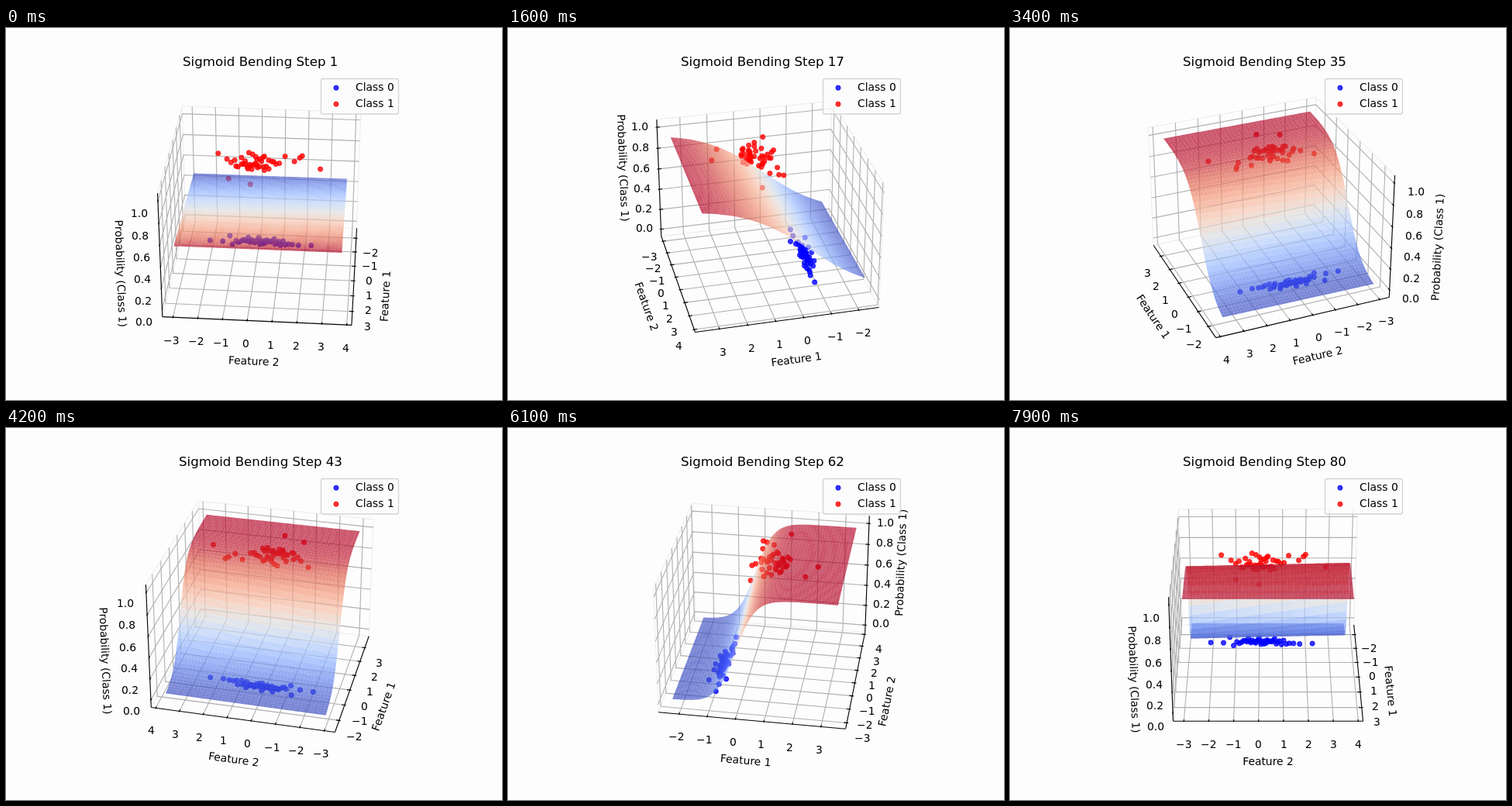
Animation of 640x480 px, one loop 8000 ms. Source, as an HTML page with a canvas:

```html
<!DOCTYPE html>
<html lang="en">
<head>
<meta charset="utf-8">
<title>Sigmoid Bending</title>
<style>
  html, body { margin: 0; width: 100%; height: 100%; overflow: hidden; background: #fdfdfd; }
  canvas { display: block; width: 640px; height: 480px; }
</style>
</head>
<body>
<canvas id="stage" width="640" height="480"></canvas>
<script>
const ctx = document.getElementById('stage').getContext('2d');
const FONT = '"DejaVu Sans", sans-serif';
const STEPS = 80, STEP_MS = 100;
const BLUE = '0,0,255', RED = '255,0,0';

// Box half sizes and the data ranges that fill it
const HALF = 0.5952, HALF_Z = 0.4464;
const X_RANGE = [-2.318, 3.435], Y_RANGE = [-2.946, 3.707];
const DELTA = 0.09524, DELTA_Z = 0.07143;
const PAD_TICK = 1.0372, PAD_LABEL = 2.2548;

const wx = x => (x - 0.559) * 0.1806;
const wy = y => (y - 0.381) * 0.15617;
const wz = z => (z - 0.5) * 0.7793;

function random(seed) {
  return () => {
    seed = (seed * 1664525 + 1013904223) % 4294967296;
    return seed / 4294967296;
  };
}

// Cloud with logistic quantiles along y and seeded normal scatter along x
function cloud(seed, count, x, y) {
  const rnd = random(seed);
  const normal = () => (rnd() + rnd() + rnd() - 1.5) * 2;
  return Array.from({ length: count }, (_, i) => {
    const p = (i + 0.5) / count;
    return [x.mean + x.spread * normal(), y.mean + y.spread * Math.log(p / (1 - p))];
  });
}

const CLASS_0 = cloud(7, 44, { mean: -0.98, spread: 0.15 }, { mean: 0.1, spread: 0.49 });
const CLASS_1 = cloud(21, 40, { mean: 0.95, spread: 0.38 }, { mean: 0.05, spread: 0.36 })
  .concat([[1.17, 2.7], [0.4, 1.82], [0.25, 1.91], [2.44, 0.01], [2.1, -0.89]]);

const COOLWARM = [
  [59, 76, 192], [98, 130, 234], [141, 176, 254], [184, 208, 249], [221, 221, 221],
  [245, 196, 173], [244, 154, 123], [222, 96, 77], [180, 4, 38]
];

function coolwarm(t, alpha) {
  const p = Math.min(Math.max(t, 0), 1) * 8;
  const i = Math.min(Math.floor(p), 7);
  const rgb = COOLWARM[i].map((c, n) => Math.round(c + (COOLWARM[i + 1][n] - c) * (p - i)));
  return `rgba(${rgb.join(',')},${alpha})`;
}

// Perspective camera: elevation 30 degrees, distance 10
function camera(azimuth) {
  const ca = Math.cos(azimuth), sa = Math.sin(azimuth);
  const ce = Math.cos(Math.PI / 6), se = 0.5;
  return (x, y, z) => {
    const near = x * ca + y * sa;
    const depth = near * ce + z * se;
    const scale = 1997.8 / (10 - depth);
    return [333 + (y * ca - x * sa) * scale, 237.4 - (z * ce - near * se) * scale, depth];
  };
}

function line(points, color, width) {
  ctx.beginPath();
  points.forEach(p => ctx.lineTo(p[0], p[1]));
  ctx.strokeStyle = color;
  ctx.lineWidth = width;
  ctx.stroke();
}

function setFont(size = 13.89) {
  ctx.font = `${size}px ${FONT}`;
  ctx.fillStyle = '#000';
}

// Level text sits on whole pixels
function text(str, x, y, size) {
  setFont(size);
  ctx.fillText(str, Math.round(x - ctx.measureText(str).width / 2), Math.round(y));
}

function dot(x, y, rgb) {
  ctx.beginPath();
  ctx.arc(x, y, 3.1, 0, 7);
  ctx.fillStyle = ctx.strokeStyle = `rgba(${rgb},0.8)`;
  ctx.lineWidth = 0.9;
  ctx.fill();
  ctx.stroke();
}

function axisLabel(str, at, from, to) {
  let angle = Math.atan2(to[1] - from[1], to[0] - from[0]) % Math.PI;
  if (angle > Math.PI / 2) angle -= Math.PI;
  if (angle < -Math.PI / 2) angle += Math.PI;
  ctx.save();
  ctx.translate(at[0], at[1]);
  ctx.rotate(angle);
  setFont();
  ctx.fillText(str, -ctx.measureText(str).width / 2, 3.83);
  ctx.restore();
}

// sx, sy: sign of the side of the box that faces the viewer
function drawAxes(proj, sx, sy) {
  const fx = sx * HALF, fy = sy * HALF, lo = -HALF_Z, hi = HALF_Z;
  const out = (sign, pad) => sign * (HALF + DELTA * pad);
  const down = pad => lo - DELTA_Z * pad;

  line([proj(fx, -fy, lo), proj(fx, -fy, hi), proj(-fx, -fy, hi), proj(-fx, fy, hi), proj(-fx, fy, lo)], '#efefef', 1.2);
  line([proj(-fx, -fy, hi), proj(-fx, -fy, lo)], '#efefef', 1.2);
  line([proj(fx, -fy, lo), proj(-fx, -fy, lo), proj(-fx, fy, lo)], '#efefef', 1.2);

  const axes = [
    {
      name: 'Feature 1', first: -2, count: 6, step: 1, digits: 0, world: wx,
      grid: v => [proj(v, fy, lo), proj(v, -fy, lo), proj(v, -fy, hi)],
      at: (v, pad) => proj(v, out(sy, pad), down(pad)),
      tick: (v, pad) => proj(v, out(sy, pad), lo),
      ends: [proj(-HALF, fy, lo), proj(HALF, fy, lo)]
    },
    {
      name: 'Feature 2', first: -3, count: 8, step: 1, digits: 0, world: wy,
      grid: v => [proj(fx, v, lo), proj(-fx, v, lo), proj(-fx, v, hi)],
      at: (v, pad) => proj(out(sx, pad), v, down(pad)),
      tick: (v, pad) => proj(out(sx, pad), v, lo),
      ends: [proj(fx, -HALF, lo), proj(fx, HALF, lo)]
    },
    {
      name: 'Probability (Class 1)', first: 0, count: 6, step: 0.2, digits: 1, world: wz,
      grid: v => [proj(fx, -fy, v), proj(-fx, -fy, v), proj(-fx, fy, v)],
      at: (v, pad) => proj(out(sx, pad), out(-sy, pad), v),
      tick: (v, pad) => proj(out(sx, pad), -fy, v),
      ends: [proj(fx, -fy, lo), proj(fx, -fy, hi)]
    }
  ];

  for (const axis of axes) {
    const values = Array.from({ length: axis.count }, (_, i) => axis.first + i * axis.step);
    for (const v of values) line(axis.grid(axis.world(v)), '#b0b0b0', 1.11);
    line(axis.ends, '#000', 1.11);
    for (const v of values) {
      const w = axis.world(v);
      line([axis.tick(w, 0.1), axis.tick(w, -0.2)], '#000', 1.11);
      const p = axis.at(w, PAD_TICK);
      text(v.toFixed(axis.digits).replace('-', '\u2212'), p[0], p[1] + 10.55);
    }
    axisLabel(axis.name, axis.at(0, PAD_LABEL), ...axis.ends);
  }
}

function drawSamples(proj, samples, z, rgb) {
  samples.map(([x, y]) => proj(wx(x), wy(y), wz(z)))
    .sort((a, b) => a[2] - b[2])
    .forEach(p => dot(p[0], p[1], rgb));
}

function drawSurface(proj, steepness) {
  const n = 49, rows = [], quads = [];
  const at = (range, i) => range[0] + (range[1] - range[0]) * i / n;
  for (let j = 0; j <= n; j++) {
    const y = at(Y_RANGE, j), row = [];
    for (let i = 0; i <= n; i++) {
      const x = at(X_RANGE, i);
      const z = 1 / (1 + Math.exp(-steepness * (x + 0.038 * y + 0.166)));
      row.push([...proj(wx(x), wy(y), wz(z)), z]);
    }
    rows.push(row);
  }
  for (let j = 0; j < n; j++) {
    for (let i = 0; i < n; i++) {
      const pts = [rows[j][i], rows[j][i + 1], rows[j + 1][i + 1], rows[j + 1][i]];
      const mean = k => pts.reduce((sum, p) => sum + p[k], 0) / 4;
      quads.push({ pts, depth: mean(2), z: mean(3) });
    }
  }
  const heights = quads.map(q => q.z);
  const min = Math.min(...heights), max = Math.max(...heights);
  quads.sort((a, b) => a.depth - b.depth);
  for (const q of quads) {
    ctx.beginPath();
    q.pts.forEach(p => ctx.lineTo(p[0], p[1]));
    ctx.fillStyle = coolwarm((q.z - min) / (max - min), 0.7);
    ctx.fill();
  }
}

function drawLegend() {
  ctx.beginPath();
  ctx.roundRect(406.5, 65.5, 100, 45.5, 2.8);
  ctx.fillStyle = 'rgba(253,253,253,0.8)';
  ctx.strokeStyle = 'rgba(204,204,204,0.8)';
  ctx.lineWidth = 1.39;
  ctx.fill();
  ctx.stroke();
  [BLUE, RED].forEach((rgb, i) => {
    dot(426, 77.2 + 21 * i, rgb);
    setFont();
    ctx.fillText(`Class ${i}`, 451, 81 + 21 * i);
  });
}

function draw(step) {
  const azimuth = step * 4.5 * Math.PI / 180;
  const proj = camera(azimuth);
  const side = v => v > -1e-9 ? 1 : -1;
  ctx.fillStyle = '#fdfdfd';
  ctx.fillRect(0, 0, 640, 480);
  drawAxes(proj, side(Math.cos(azimuth)), side(Math.sin(azimuth)));
  drawSamples(proj, CLASS_0, 0, BLUE);
  drawSamples(proj, CLASS_1, 1, RED);
  drawSurface(proj, step * 0.0467);
  text(`Sigmoid Bending Step ${step}`, 328, 49, 16.67);
  drawLegend();
}

const start = performance.now();
let shown = 0;

function tick() {
  const step = Math.floor((performance.now() - start) / STEP_MS) % STEPS + 1;
  if (step !== shown) draw(shown = step);
  requestAnimationFrame(tick);
}
tick();
</script>
</body>
</html>
```
